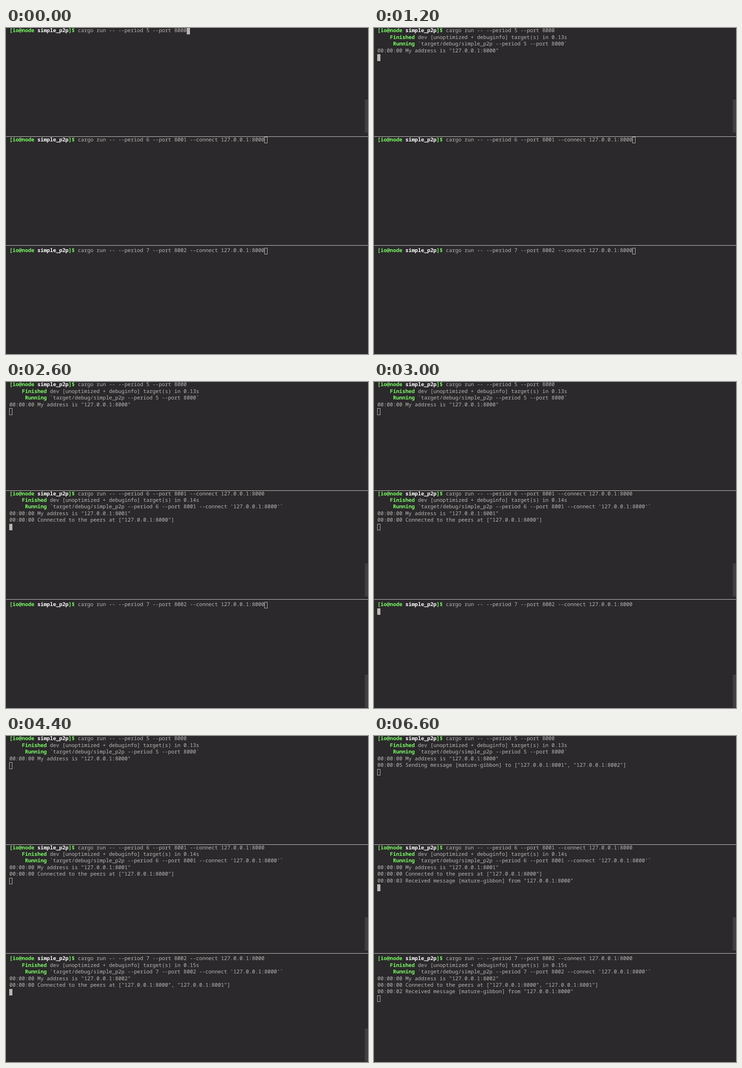
These frames come from a looping animation (789x710 px, 8000 ms). An HTML page:

```html
<!DOCTYPE html>
<html lang="en">
<head>
<meta charset="utf-8">
<title>Three terminals</title>
<style>
:root { --w: 6.78px; --h: 14.4px; --x: 7.2px; --fg: #bab6b5; --bg: #2b292b; }
html, body { margin: 0; width: 100%; height: 100%; overflow: hidden; background: var(--bg); }
#stage { position: relative; width: 789px; height: 710px; overflow: hidden; background: var(--bg); }

.pane { position: absolute; left: 0; width: 100%; height: 236px; }
#a { top: -.5px; }
#b { top: 236.8px; }
#c { top: 478.6px; }
.rule { position: absolute; left: 0; width: 100%; height: 1px; background: #c9c6c0; }

pre {
  position: absolute; left: 7.5px; top: -.2px; margin: 0;
  font: 11.3px/var(--h) "Noto Sans Mono", "DejaVu Sans Mono", monospace;
  font-variant-ligatures: none; text-rendering: geometricPrecision;
  color: var(--fg);
}
b { color: #7bfb66; }
b i { color: #fff; font-style: normal; }

/* Everything but the fading scrollbar changes in hard steps. */
.out, .msg, .cur, .bar { animation: 8s step-end infinite; }
.cur {
  position: absolute; width: 7px; height: 14.5px; box-sizing: border-box;
  border: 1px solid var(--fg);
}
.bar { position: absolute; left: 782px; width: 7px; height: 72px; background: #403e40; }

#a .out { animation-name: out-a; }
#b .out { animation-name: out-b; }
#c .out { animation-name: out-c; }
.msg { animation-name: msg; }
#a .cur { animation-name: cur-a; }
#b .cur { animation-name: cur-b; }
#c .cur { animation-name: cur-c; }
#bar-a { top: 156px; animation-name: bar-a; animation-timing-function: linear; }
#bar-b { top: 395px; animation-name: bar-b; }
#bar-c { top: 637px; animation-name: bar-c; }

@keyframes out-a { 0% { visibility: hidden } 15%, 100% { visibility: visible } }
@keyframes out-b { 0% { visibility: hidden } 32.5%, 100% { visibility: visible } }
@keyframes out-c { 0% { visibility: hidden } 42.5%, 100% { visibility: visible } }
@keyframes msg { 0% { visibility: hidden } 80%, 100% { visibility: visible } }

@keyframes cur-a {
  0% { left: calc(var(--x) + 57 * var(--w)); top: 0; background: var(--fg) }
  12.5% { left: var(--x); top: var(--h); background: var(--fg) }
  15% { left: var(--x); top: calc(4 * var(--h)); background: var(--fg) }
  25% { left: var(--x); top: calc(4 * var(--h)); background: transparent }
  80%, 100% { left: var(--x); top: calc(5 * var(--h)); background: transparent }
}
@keyframes cur-b {
  0% { left: calc(var(--x) + 82 * var(--w)); top: 0; background: transparent }
  25% { left: calc(var(--x) + 82 * var(--w)); top: 0; background: var(--fg) }
  30% { left: var(--x); top: var(--h); background: var(--fg) }
  32.5% { left: var(--x); top: calc(5 * var(--h)); background: var(--fg) }
  35% { left: var(--x); top: calc(5 * var(--h)); background: transparent }
  72.5% { left: var(--x); top: calc(5 * var(--h)); background: var(--fg) }
  80%, 100% { left: var(--x); top: calc(6 * var(--h)); background: var(--fg) }
}
@keyframes cur-c {
  0% { left: calc(var(--x) + 82 * var(--w)); top: 0; background: transparent }
  35% { left: calc(var(--x) + 82 * var(--w)); top: 0; background: var(--fg) }
  37.5% { left: var(--x); top: var(--h); background: var(--fg) }
  42.5% { left: var(--x); top: calc(5 * var(--h)); background: var(--fg) }
  72.5% { left: var(--x); top: calc(5 * var(--h)); background: transparent }
  80%, 100% { left: var(--x); top: calc(6 * var(--h)); background: transparent }
}

@keyframes bar-a { 0%, 26% { opacity: 1 } 33%, 100% { opacity: 0 } }
@keyframes bar-b { 0% { opacity: 0 } 22.5%, 100% { opacity: 1 } }
@keyframes bar-c { 0% { opacity: 0 } 32.5% { opacity: 1 } 80%, 100% { opacity: 0 } }
</style>
</head>
<body>
<div id="stage">
<section class="pane" id="a">
<pre><b>[io@node <i>simple_p2p</i>]$</b> cargo run -- --period 5 --port 8000
<span class="out">    <b>Finished</b> dev [unoptimized + debuginfo] target(s) in 0.13s
     <b>Running</b> `target/debug/simple_p2p --period 5 --port 8000`
00:00:00 My address is "127.0.0.1:8000"</span>
<span class="msg">00:00:05 Sending message [mature-gibbon] to ["127.0.0.1:8001", "127.0.0.1:8002"]</span></pre>
<div class="cur"></div>
</section>
<section class="pane" id="b">
<pre><b>[io@node <i>simple_p2p</i>]$</b> cargo run -- --period 6 --port 8001 --connect 127.0.0.1:8000
<span class="out">    <b>Finished</b> dev [unoptimized + debuginfo] target(s) in 0.14s
     <b>Running</b> `target/debug/simple_p2p --period 6 --port 8001 --connect '127.0.0.1:8000'`
00:00:00 My address is "127.0.0.1:8001"
00:00:00 Connected to the peers at ["127.0.0.1:8000"]</span>
<span class="msg">00:00:03 Received message [mature-gibbon] from "127.0.0.1:8000"</span></pre>
<div class="cur"></div>
</section>
<section class="pane" id="c">
<pre><b>[io@node <i>simple_p2p</i>]$</b> cargo run -- --period 7 --port 8002 --connect 127.0.0.1:8000
<span class="out">    <b>Finished</b> dev [unoptimized + debuginfo] target(s) in 0.15s
     <b>Running</b> `target/debug/simple_p2p --period 7 --port 8002 --connect '127.0.0.1:8000'`
00:00:00 My address is "127.0.0.1:8002"
00:00:00 Connected to the peers at ["127.0.0.1:8000", "127.0.0.1:8001"]</span>
<span class="msg">00:00:02 Received message [mature-gibbon] from "127.0.0.1:8000"</span></pre>
<div class="cur"></div>
</section>
<div class="rule" style="top: 236px"></div>
<div class="rule" style="top: 473px"></div>
<div class="bar" id="bar-a"></div>
<div class="bar" id="bar-b"></div>
<div class="bar" id="bar-c"></div>
</div>
</body>
</html>
```
